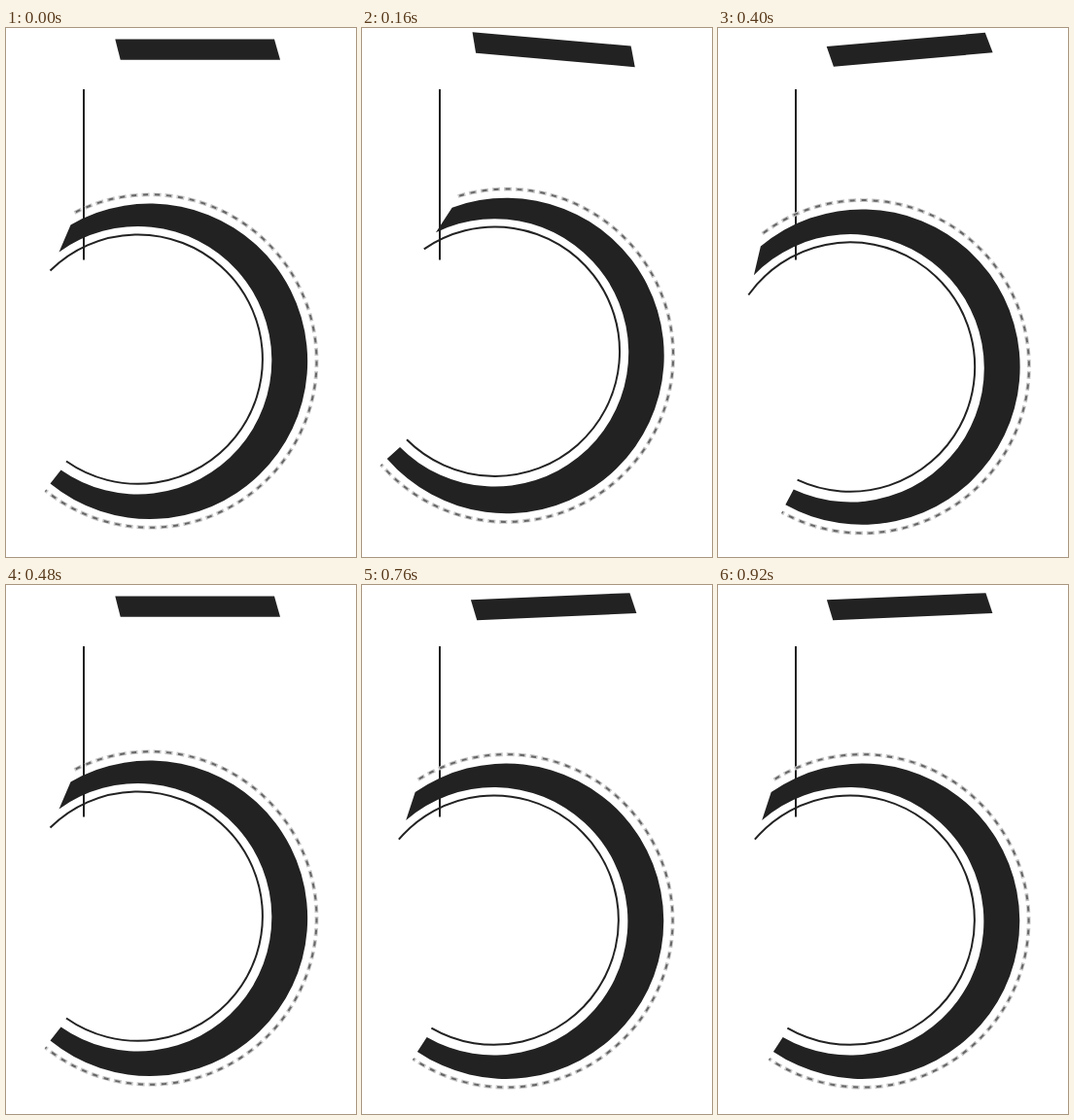
An HTML page for the animation above (960 ms loop, 360 by 544 pixels).

```html
<!DOCTYPE html>
<html lang="en">
<head>
<meta charset="utf-8">
<title>Swinging five</title>
<style>
  html, body { margin: 0; width: 100%; height: 100%; overflow: hidden; background: #fff; }
  svg { display: block; width: 360px; height: 544px; }
</style>
</head>
<body>
<svg viewBox="0 0 360 544" fill="none" stroke="none">
  <path id="bar" fill="#222" d="M112.3 11.6H276L282 32.8H117.7Z"/>
  <path stroke="#222" stroke-width="2" d="M80 63V238.5"/>
  <g id="bowl">
    <path fill="#222" d="M67 203A162.2 162.2 0 1 1 46 469L57 455A137.7 137.7 0 1 0 55 231Z"/>
    <path stroke="#222" stroke-width="2" d="M46 250A128.2 128.2 0 1 1 62.5 446"/>
    <path stroke="#c8c8c8" stroke-width="3.8" stroke-dasharray="8 4" d="M71 190.5A171.2 171.2 0 1 1 41 476"/>
    <path stroke="#666" stroke-width="2" stroke-dasharray="5 7" stroke-dashoffset="-1.5" d="M71 190.5A171.2 171.2 0 1 1 41 476"/>
  </g>
</svg>
<script>
  const STEP = 40;      // ms per pose
  const PERIOD = 12;    // poses per swing
  const bar = document.getElementById("bar");
  const bowl = document.getElementById("bowl");

  // Triangle wave: 0, 3, 0, -3, 0 over one swing
  function swing(pose) {
    const p = (pose + 3) % PERIOD;
    return 3 - Math.abs(p - 6);
  }

  function draw(ms) {
    const s = swing(Math.floor((ms + 0.01) / STEP));
    bar.setAttribute("transform", `rotate(${2.5 * s} 197 22.2)`);
    bowl.setAttribute("transform", `translate(-0.5 -0.5) rotate(${5 * s} 182 343.5)`);
  }

  let start;
  function tick(now) {
    start ??= now;
    draw(now - start);
    requestAnimationFrame(tick);
  }
  draw(0);
  requestAnimationFrame(tick);
</script>
</body>
</html>
```
